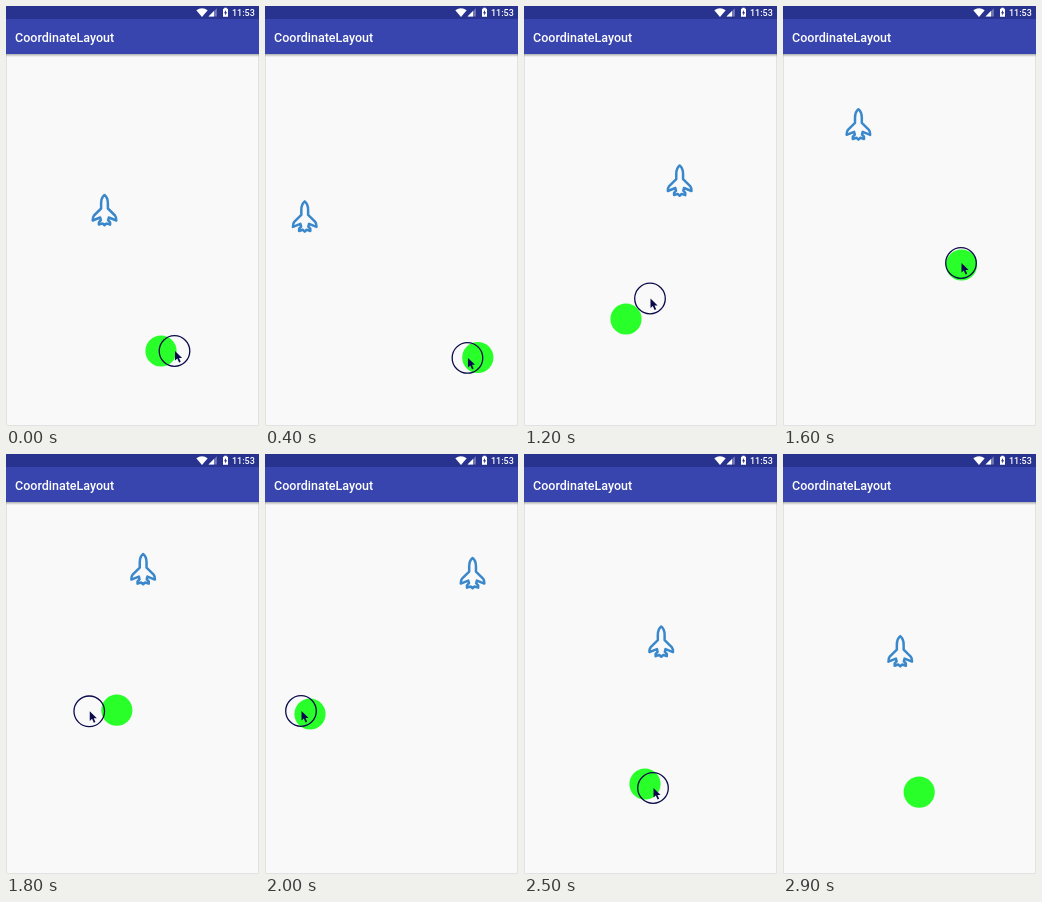
An HTML page for the animation above (3000 ms loop, 253 by 420 pixels).

```html
<!DOCTYPE html>
<html lang="en">
<head>
<meta charset="utf-8">
<title>CoordinateLayout</title>
<style>
  html, body { margin: 0; width: 100%; height: 100%; overflow: hidden; background: #f9f9f9; }
  svg { display: block; width: 253px; height: 420px; }
  text { font-family: Roboto, sans-serif; font-weight: 500; fill: #fff; }
</style>
</head>
<body>
<svg viewBox="0 0 253 420">
  <defs>
    <linearGradient id="shade" x2="0" y2="1">
      <stop stop-color="#000" stop-opacity=".3"/>
      <stop offset="1" stop-color="#000" stop-opacity="0"/>
    </linearGradient>
  </defs>
  <rect width="253" height="420" fill="#f9f9f9"/>
  <path d="M.5 48V419.5H252.5V48" fill="none" stroke="#e2e2e2"/>
  <rect y="48" width="253" height="3" fill="url(#shade)"/>
  <rect width="253" height="48" fill="#3845ae"/>
  <rect width="253" height="13" fill="#28338f"/>

  <g fill="#fff">
    <path d="M190.3 4.3Q196 0 201.7 4.3L196 11Z"/>
    <path d="M202.5 10.5L210.8 2.2V10.5Z" opacity=".35"/>
    <path d="M202.5 10.5L208 5V10.5Z"/>
    <path d="M218.2 1.8H220.8V2.8H222V10.8H217V2.8H218.2Z"/>
  </g>
  <path d="M220 4L218 7.3H219.2V9.6L221.1 6.2H220Z" fill="#28338f"/>
  <text x="226" y="9.8" font-size="9">11:53</text>
  <text x="9" y="35.5" font-size="12.5">CoordinateLayout</text>

  <g id="plane" fill="none" stroke="#3a88cb" stroke-width="2.5" stroke-linejoin="round">
    <path d="M0-15C-2-13.5-3.4-10-3.4-6.5V-1.5L-10.5 5.5Q-11.8 7-11.8 10.5L-4.3 7.5L-3.6 10.2L-5.6 12.3V14.6L-2 13.4L0 15.2L2 13.4L5.6 14.6V12.3L3.6 10.2L4.3 7.5L11.8 10.5Q11.8 7 10.5 5.5L3.4-1.5V-6.5C3.4-10 2-13.5 0-15Z"/>
  </g>
  <circle id="ball" r="15.6" fill="#29ff29"/>
  <g id="touch">
    <circle r="15.3" fill="none" stroke="#0b0b4c" stroke-width="1.3"/>
    <path d="M.5 0V9.6L2.8 7.5L4.6 11.4L6.2 10.7L4.5 6.9H7.6Z" fill="#0b0b4c"/>
  </g>
</svg>
<script>
  const LOOP = 3000, STEP = 100, RELEASE = 2700;
  const BALL_LAG = 60, PLANE_LAG = 72;

  // Drag path: time, x, y
  const path = [
    [-60, 155, 345], [0, 168.5, 345], [300, 214, 351], [450, 190, 352],
    [600, 137, 351], [740, 84, 347], [800, 59, 342], [920, 40, 337],
    [1040, 70, 328], [1140, 102, 313], [1200, 126, 292.5], [1340, 168, 266],
    [1540, 178.5, 259], [1600, 178, 257], [1720, 120, 256], [1880, 51, 259],
    [1940, 45, 260], [2000, 36, 257], [2200, 55, 285], [2400, 103, 324],
    [2440, 121, 330], [2500, 129, 334], [2640, 136, 338], [2900, 136, 338]
  ];

  function slope(i, axis) {
    const a = path[Math.max(i - 1, 0)], b = path[Math.min(i + 1, path.length - 1)];
    return (b[axis] - a[axis]) / (b[0] - a[0]);
  }

  // Cubic Hermite curve through the drag path
  function at(time) {
    const t = Math.max(path[0][0], Math.min(time, path[path.length - 1][0]));
    let i = 0;
    while (i < path.length - 2 && path[i + 1][0] < t) i++;
    const a = path[i], b = path[i + 1], span = b[0] - a[0];
    const u = (t - a[0]) / span, v = 1 - u;
    return [1, 2].map(k =>
      a[k] * v * v * (1 + 2 * u) + b[k] * u * u * (3 - 2 * u) +
      span * u * v * (slope(i, k) * v - slope(i + 1, k) * u));
  }

  const [plane, ball, touch] = ["plane", "ball", "touch"].map(id => document.getElementById(id));
  const place = (el, x, y) => el.setAttribute("transform", `translate(${x} ${y})`);

  function draw(time) {
    const t = Math.floor(time % LOOP / STEP) * STEP;
    const [px, py] = at(t - PLANE_LAG);
    place(plane, 253.5 - px, py - 141);
    place(ball, ...at(t - BALL_LAG));
    place(touch, ...at(t));
    touch.style.display = t < RELEASE ? "" : "none";
  }

  const start = performance.now();
  function tick() {
    draw(performance.now() - start);
    requestAnimationFrame(tick);
  }
  tick();
</script>
</body>
</html>
```
